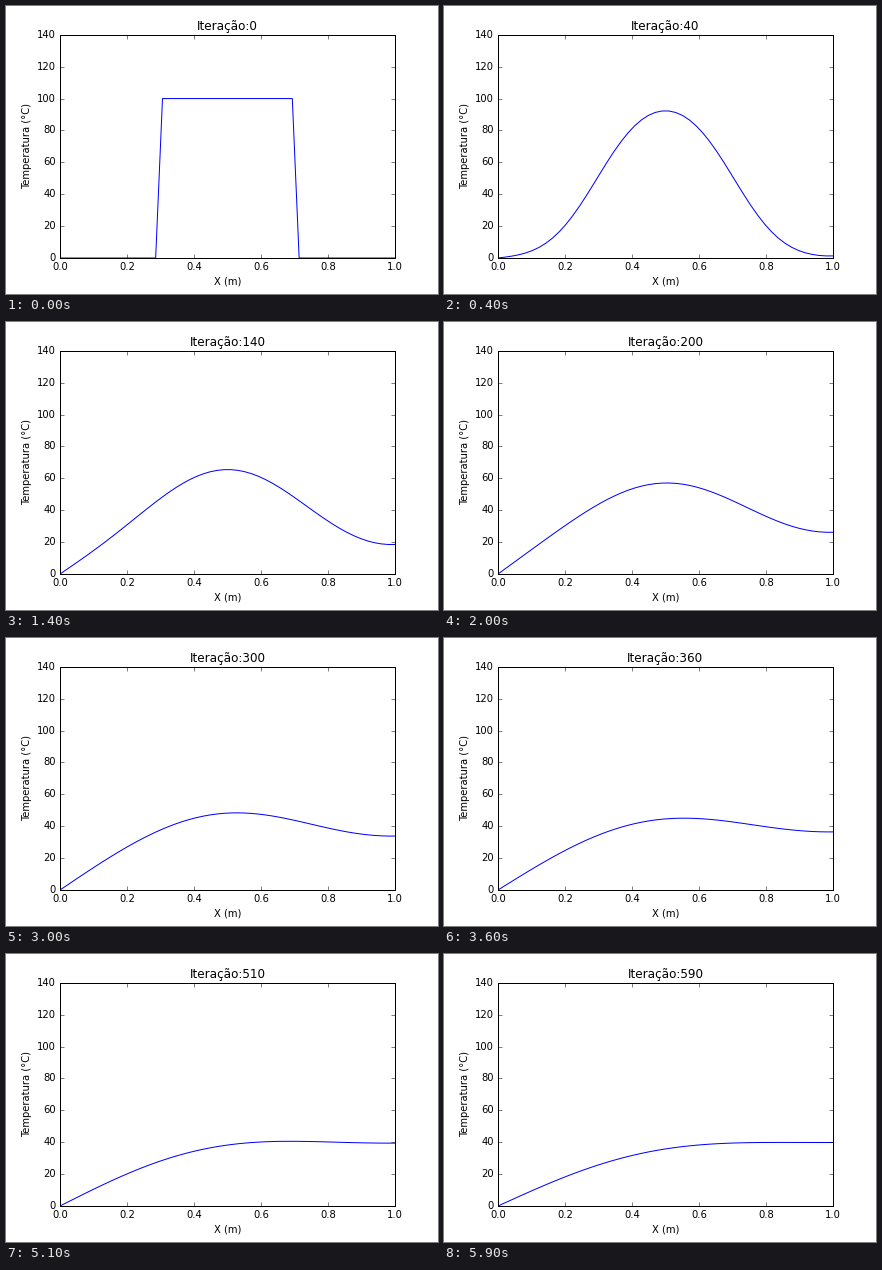
Animation, 432 px wide and 288 px high, one loop 6 s. Source, as a matplotlib script:

```python
import matplotlib.pyplot as plt
import numpy as np
from matplotlib.animation import FuncAnimation

NODES = 50
FOURIER = 0.4          # alpha * dt / dx**2
STEPS_PER_FRAME = 10
FRAMES = 60

plt.style.use("classic")
plt.rcParams.update({
    "font.family": "DejaVu Sans",
    "font.size": 10,
    "figure.facecolor": "white",
    "figure.subplot.bottom": 0.125,
    "savefig.dpi": "figure",
})


def step(u):
    """Explicit diffusion step: cold left end, insulated right end."""
    new = u.copy()
    new[1:-1] += FOURIER * (u[2:] - 2 * u[1:-1] + u[:-2])
    new[-1] = new[-2]
    return new


def solve(x):
    u = np.where((x > 0.3) & (x < 0.7), 100.0, 0.0)
    history = [u]
    for _ in range((FRAMES - 1) * STEPS_PER_FRAME):
        u = step(u)
        history.append(u)
    return history


x = np.linspace(0, 1, NODES)
history = solve(x)

fig, ax = plt.subplots(figsize=(6, 4), dpi=72)
line, = ax.plot(x, history[0], "b-")
ax.set_xlim(0, 1)
ax.set_ylim(0, 140)
ax.set_xlabel("X (m)")
ax.set_ylabel("Temperatura (°C)")
title = ax.set_title("Iteração:0")


def update(frame):
    iteration = frame * STEPS_PER_FRAME
    line.set_ydata(history[iteration])
    title.set_text(f"Iteração:{iteration}")
    return line, title


anim = FuncAnimation(fig, update, frames=FRAMES, interval=100,
                     init_func=lambda: update(0), repeat=True)
plt.show()
```
